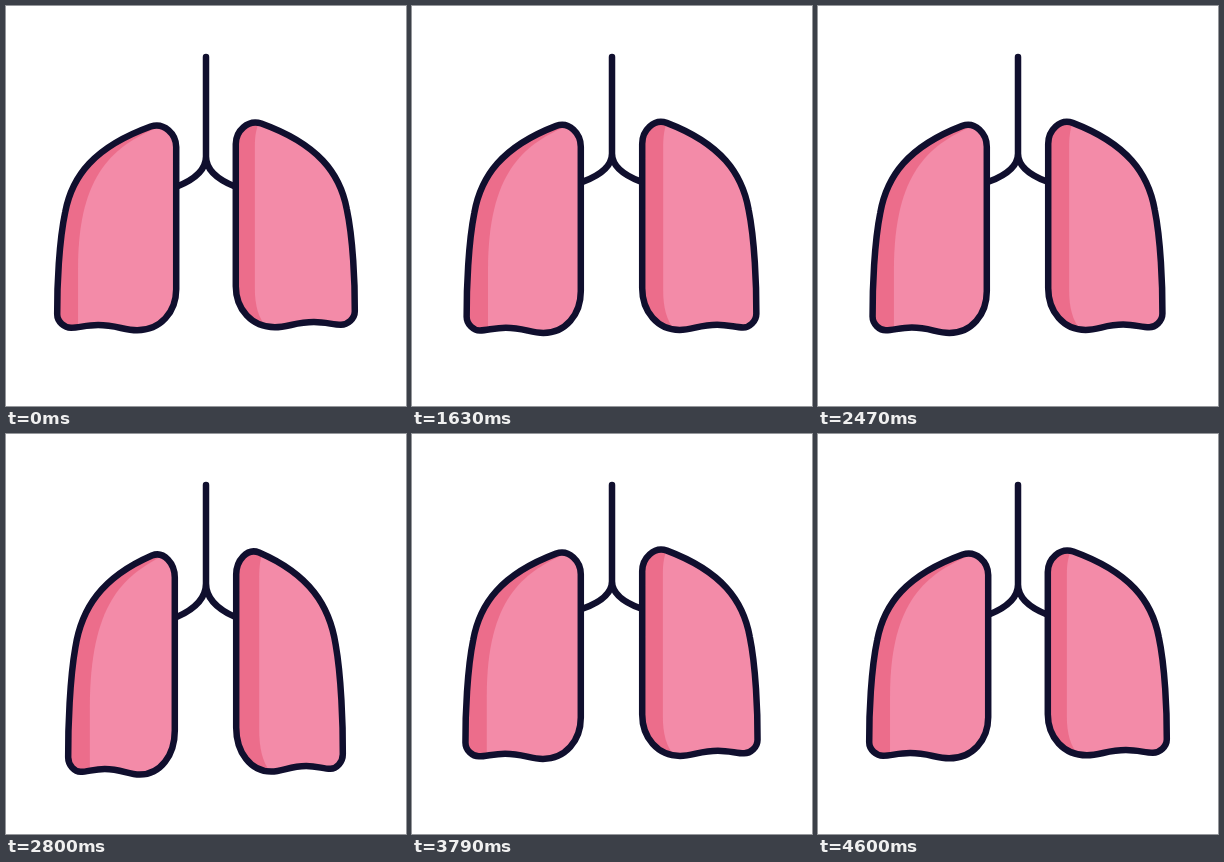
These frames come from a looping animation (400 px wide and 400 px high, 4.63 s). An HTML page with a canvas:

```html
<!DOCTYPE html>
<html lang="en">
<head>
<meta charset="utf-8">
<title>Breathing lungs</title>
<style>
  html, body { margin: 0; width: 100%; height: 100%; overflow: hidden; background: #fff; }
  canvas { display: block; width: 400px; height: 400px; }
</style>
</head>
<body>
<canvas id="stage" width="400" height="400"></canvas>
<script>
const ctx = document.getElementById('stage').getContext('2d');
const LOOP = 4630;
const INK = '#100f2e', LIGHT = '#f38ba8', DARK = '#ec6d8b';

// Left lung; the right one is its mirror image, 3px higher.
const lung = new Path2D(`M170 141V283C170 306 154 324 131 324C118 324 110 318.8 92 318.8
  C80 318.8 73 321.5 65 321.5C58.5 321.5 51.2 315.5 51.2 308C51 280 53 235 59.2 206
  C66 170 88 141 144.5 120.5C158 116 170 128 170 141Z`);
const leftLight = new Path2D('M150 122C110 140 72 165 72 262V335H180V110Z');
const rightLight = new Path2D('M145 116C149 123 151 131 151 143V285C151 303 147 317 137 326H30V105Z');

// Outer and inner edge, top, bottom, fork height, branch end, shade shift, mirror width
const REST = [52, 170.2, 120, 324.3, 150.5, 180.5, 0, 400];
const LONG = [63, 168.8, 121, 340.7, 149.5, 183, 6, 399];
const WIDE = [44.5, 168.8, 117, 307.3, 144.5, 165, -2, 399];
const INHALE = [.2, .41], EXHALE = [.333, .667];

// Time, pose, and the easing that leads to it
const KEYS = [
  [0, REST], [1010, REST, EXHALE], [1440, LONG, EXHALE], [2075, WIDE, INHALE],
  [2785, LONG, EXHALE], [3395, WIDE, INHALE], [4160, LONG, EXHALE],
  [4610, REST, INHALE], [LOOP, REST, EXHALE]
];

// Cubic Bezier easing with control points (x1, 0) and (x2, 1)
function ease(x, [x1, x2]) {
  let low = 0, high = 1;
  for (let i = 0; i < 20; i++) {
    const s = (low + high) / 2, r = 1 - s;
    if (3 * s * r * r * x1 + 3 * s * s * r * x2 + s ** 3 < x) low = s;
    else high = s;
  }
  return low * low * (3 - 2 * low);
}

function poseAt(time) {
  const i = KEYS.findIndex(([end]) => end > time);
  const [start, from] = KEYS[i - 1], [end, to, curve] = KEYS[i];
  const p = ease((time - start) / (end - start), curve);
  return from.map((value, k) => value + (to[k] - value) * p);
}

function placed(path, matrix) {
  const result = new Path2D();
  result.addPath(path, matrix);
  return result;
}

function drawLung([outer, inner, top, bottom], light, shift) {
  const sx = (inner - outer) / 118, sy = (bottom - top) / 204;
  const x = inner - 170 * sx, y = top - 120 * sy;
  const outline = placed(lung, new DOMMatrix([sx, 0, 0, sy, x, y]));
  ctx.save();
  ctx.clip(outline);
  ctx.fillStyle = DARK;
  ctx.fillRect(0, 0, 400, 400);
  ctx.fillStyle = LIGHT;
  ctx.fill(placed(light, new DOMMatrix([sx, 0, 0, sy, x + shift, y])));
  ctx.restore();
  ctx.stroke(outline);
}

function draw(now) {
  const pose = poseAt(now % LOOP);
  const [fork, end, shade, mirror] = pose.slice(4);
  ctx.setTransform(1, 0, 0, 1, 0, 0);
  ctx.fillStyle = '#fff';
  ctx.fillRect(0, 0, 400, 400);
  ctx.strokeStyle = INK;
  ctx.lineWidth = 6.5;
  ctx.lineCap = ctx.lineJoin = 'round';

  ctx.beginPath();
  ctx.moveTo(200, 51);
  ctx.lineTo(200, fork);
  for (const side of [-1, 1]) {
    ctx.moveTo(200, fork);
    ctx.bezierCurveTo(200, fork + (end - fork) * .5, 200 + side * 14, end - (end - fork) * .2,
      200 + side * 29, end);
  }
  ctx.stroke();

  drawLung(pose, leftLight, shade / 2);
  ctx.setTransform(-1, 0, 0, 1, mirror, -3);
  drawLung(pose, rightLight, -shade);
  requestAnimationFrame(draw);
}

requestAnimationFrame(draw);
</script>
</body>
</html>
```
